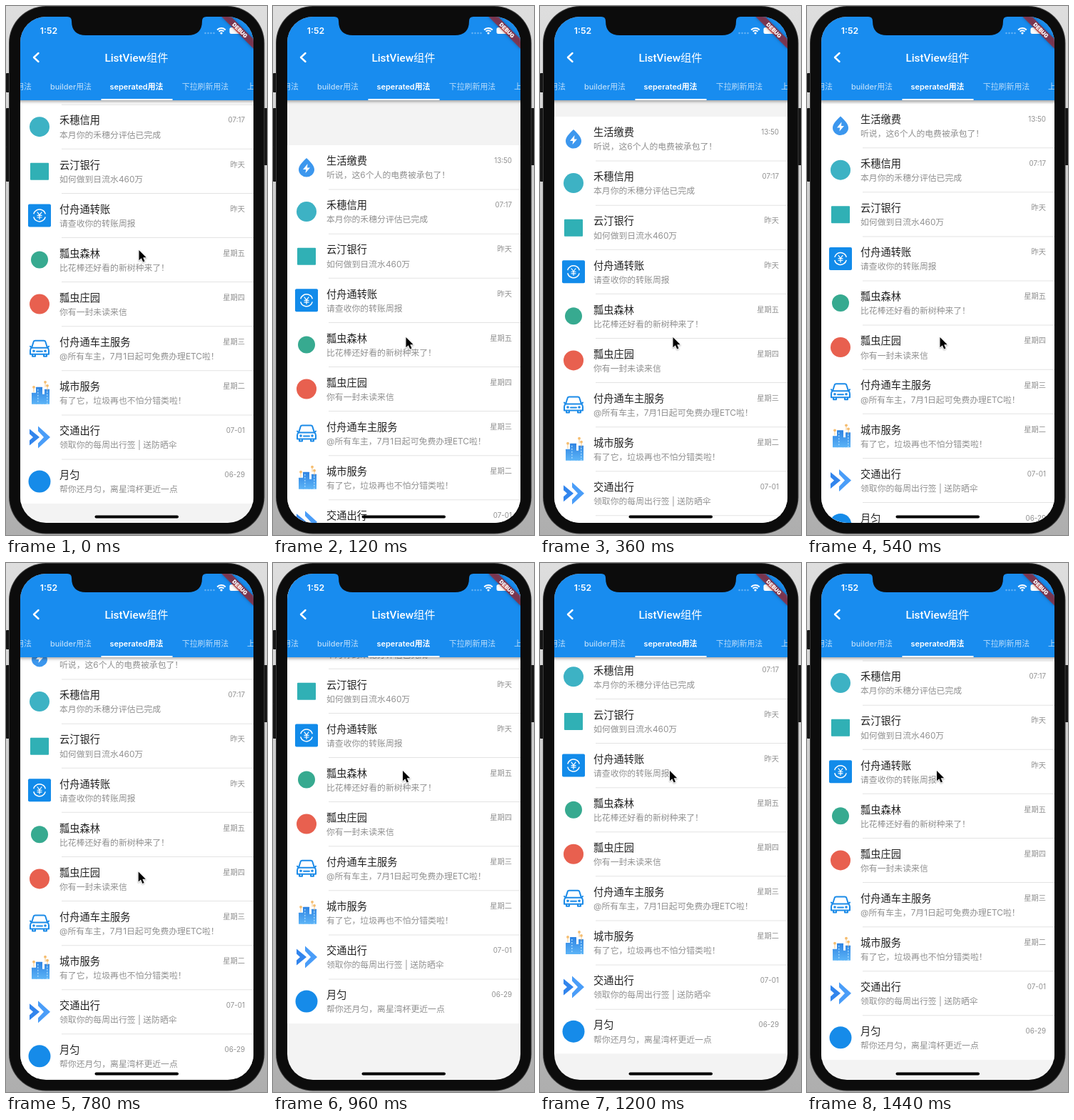
An HTML page with a canvas for the animation above (1500 ms loop, 366 px wide and 741 px high).

```html
<!DOCTYPE html>
<html lang="zh-CN">
<head>
<meta charset="utf-8">
<style>
html, body { margin: 0; width: 100%; height: 100%; overflow: hidden; }
canvas { display: block; width: 366px; height: 741px; }
</style>
</head>
<body>
<canvas id="stage"></canvas>
<script>
const W = 366, H = 741, LOOP = 1500, STEP = 60;
const SCREEN = { x: 20, y: 15, w: 327, h: 709 };
const ROW = 62.1, TOP_REST = 132, END_REST = 76.1;
const BLUE = '#188cef', BODY = '#0c0c0c';
const FAMILY = 'Inter, "Noto Sans CJK SC", "Noto Sans CJK", sans-serif';

const canvas = document.getElementById('stage');
const dpr = window.devicePixelRatio || 1;
canvas.width = W * dpr;
canvas.height = H * dpr;
const c = canvas.getContext('2d');

const rows = [
  ['生活缴费', '听说，这6个人的电费被承包了！', '13:50', drop],
  ['禾穗信用', '本月你的禾穗分评估已完成', '07:17', () => disc('#3db2c4', 14)],
  ['云汀银行', '如何做到日流水460万', '昨天', () => box(-13, -11.5, 26, 24, 1, '#30b0b5')],
  ['付舟通转账', '请查收你的转账周报', '昨天', transfer],
  ['瓢虫森林', '比花棒还好看的新树种来了！', '星期五', () => disc('#37aa90', 12)],
  ['瓢虫庄园', '你有一封未读来信', '星期四', () => disc('#e8604f', 14)],
  ['付舟通车主服务', '@所有车主，7月1日起可免费办理ETC啦！', '星期三', car],
  ['城市服务', '有了它，垃圾再也不怕分错类啦！', '星期二', city],
  ['交通出行', '领取你的每周出行签 | 送防晒伞', '07-01', chevrons],
  ['月匀', '帮你还月匀，离星湾杯更近一点', '06-29', () => disc('#168be9', 15.5)]
];

function box(x, y, w, h, r, fill) {
  c.beginPath();
  c.roundRect(x, y, w, h, r);
  c.fillStyle = fill;
  c.fill();
}

function disc(fill, r, x = 0, y = 0) {
  c.beginPath();
  c.arc(x, y, r, 0, Math.PI * 2);
  c.fillStyle = fill;
  c.fill();
}

function poly(points, fill) {
  c.beginPath();
  points.forEach(([x, y]) => c.lineTo(x, y));
  c.closePath();
  c.fillStyle = fill;
  c.fill();
}

function stroke(path, color, width) {
  c.strokeStyle = color;
  c.lineWidth = width;
  c.lineCap = c.lineJoin = 'round';
  c.stroke(new Path2D(path));
}

function text(str, x, y, size, color, align = 'left', weight = 400, family = FAMILY) {
  c.font = `${weight} ${size}px ${family}`;
  c.textAlign = align;
  c.textBaseline = 'alphabetic';
  c.fillStyle = color;
  c.fillText(str, x, y + size * 0.37);
}

// Row icons, each drawn around its own centre.
function drop() {
  c.fillStyle = '#3c97ee';
  c.fill(new Path2D('M0-13C4-9 11-3 11 3A11 10.5 0 0 1-11 3C-11-3-4-9 0-13Z'));
  poly([[1.5, -5], [-5, 3], [-0.8, 3], [-1.5, 8], [5, 0.5], [1, 0.5]], '#fff');
}

function transfer() {
  box(-16, -16, 32, 32, 2, '#128bea');
  c.strokeStyle = '#fff';
  c.lineWidth = 1.5;
  for (const start of [0.25, Math.PI + 0.25]) {
    c.beginPath();
    c.arc(0, 0, 8.5, start, start + 2.65);
    c.stroke();
  }
  stroke('M-3-4.5L0-.5L3-4.5M0-.5V5M-3 0H3M-3 2.6H3', '#fff', 1.2);
}

function car() {
  stroke('M-11-1L-8.5-9Q-8-11-6-11H6Q8-11 8.5-9L11-1M-11-1Q-13 0-13 3V8H13V3Q13 0 11-1ZM-13-3L-11-1M13-3L11-1', '#1c8be8', 2);
  stroke('M-10 9V11H-6V9M10 9V11H6V9M-4 4H4', '#1c8be8', 2);
  disc('#1c8be8', 1.8, -8, 3.5);
  disc('#1c8be8', 1.8, 8, 3.5);
}

function city() {
  const shade = c.createLinearGradient(0, -10, 0, 16);
  shade.addColorStop(0, '#2b7fe0');
  shade.addColorStop(1, '#5cb4f7');
  [[-11, 0, 7, 16], [-5, -8, 9, 24], [3, 2, 5, 14], [7, -5, 7, 21]]
    .forEach(([x, y, w, h]) => box(x, y, w, h, 0.5, shade));
  for (let i = 0; i < 5; i++) {
    box(-3, -5 + i * 4, 1.5, 2, 0, '#9fd5fc');
    box(10, -2 + i * 4, 1.5, 2, 0, '#9fd5fc');
  }
  [[-8, -8], [8, -15], [11, -10]].forEach(([x, y]) => {
    disc('#f5bd70', 1.9, x, y);
    box(x - 0.4, y, 0.8, 7, 0, '#f5bd70');
  });
}

function chevrons() {
  const arrow = (x, w, h, fill) =>
    poly([[x, -h], [x + w, 0], [x, h], [x, h - 7], [x + w - 9, 0], [x, 7 - h]], fill);
  arrow(-14, 14, 11.5, '#3285ed');
  arrow(-2, 17, 15.5, '#4a9df8');
}

// Overdamped spring: distance left after s seconds.
const spring = (slow, fast, s) => slow * Math.exp(-9.07 * s) + fast * Math.exp(-22.02 * s);

const smooth = p => {
  p = Math.min(1, Math.max(0, p));
  return p * p * (3 - 2 * p);
};

function pose(t) {
  if (t < 120) {
    const p = (t / 120) ** 1.5;
    return { top: END_REST + 119 * p, x: 186.5, y: 342 + 122 * p };
  }
  const p = smooth((t - 720) / 220);
  const cursor = { x: 186.5 - 4.5 * p, y: 464 - 173 * p };
  if (t >= 960) {
    return { top: END_REST - spring(88.4, -36.4, (t - 960) / 1000), ...cursor };
  }
  let top = TOP_REST + spring(209, -146, (t - 120) / 1000) - 173 * p;
  if (top < END_REST) top = END_REST + (top - END_REST) * 0.444;
  return { top, ...cursor };
}

function drawList(top) {
  box(20, top, 327, ROW * rows.length, 0, '#fff');
  rows.forEach(([title, note, time, icon], i) => {
    const y = top + i * ROW;
    if (y > H || y + ROW < 100) return;
    c.save();
    c.translate(47, y + 31);
    icon();
    c.restore();
    text(title, 75, y + 22, 14.22, '#202020', 'left', 500);
    text(note, 75, y + 42, 11.85, '#909090');
    text(time, 335, y + 21.5, /\d/.test(time) ? 9.8 : 10.27, '#909090', 'right');
    if (i < rows.length - 1) box(78, y + ROW - 0.5, 269, 1, 0, '#e3e3e3');
  });
}

function drawHeader() {
  c.save();
  c.shadowColor = 'rgba(0,0,0,.35)';
  c.shadowBlur = 4 * dpr;
  c.shadowOffsetY = 1.5 * dpr;
  box(10, 5, 347, 127, 0, BLUE);
  c.restore();
  stroke('M45.5 66L39 72L45.5 78', '#fff', 2.4);
  text('ListView组件', 183, 72, 15.3, '#fff', 'center', 500,
    'Roboto, "Noto Sans CJK SC", "Noto Sans CJK", sans-serif');
  const dim = 'rgba(255,255,255,.7)';
  text('用法', 36, 112.5, 10.9, dim, 'right', 500);
  text('builder用法', 91, 112.5, 10.9, dim, 'center', 500);
  text('seperated用法', 183, 112.5, 10.9, '#fff', 'center', 600);
  text('下拉刷新用法', 279.5, 112.5, 10.9, dim, 'center', 500);
  text('上拉', 338, 112.5, 10.9, dim, 'left', 500);
  box(133.5, 130, 100, 2, 0, '#fff');
}

function drawStatus() {
  text('1:52', 60, 34.5, 12.3, '#fff', 'center', 600);
  for (let i = 0; i < 4; i++) disc('rgba(255,255,255,.35)', 1.2, 279.5 + i * 4, 38);
  c.strokeStyle = '#fff';
  c.lineWidth = 2;
  c.lineCap = 'butt';
  for (const r of [4.7, 8]) {
    c.beginPath();
    c.arc(302, 39, r, -Math.PI * 0.76, -Math.PI * 0.24);
    c.stroke();
  }
  disc('#fff', 1.6, 302, 38);
  box(313.5, 30, 17, 9, 2.5, '#fff');
  c.fillStyle = BODY;
  c.fill(new Path2D('M86 10V15Q92 15 92 21Q92 41 112 41H255Q275 41 275 21Q275 15 281 15V10Z'));
}

function drawBanner() {
  c.save();
  c.translate(347, 15);
  c.rotate(Math.PI / 4);
  c.shadowColor = 'rgba(0,0,0,.5)';
  c.shadowBlur = 4 * dpr;
  box(-31.6, 22.1, 63.2, 9.5, 0, 'rgba(183,28,28,.63)');
  c.shadowColor = 'transparent';
  text('DEBUG', 0, 26.8, 7.6, '#fff', 'center', 900);
  c.restore();
}

function drawPhone() {
  const wall = c.createLinearGradient(0, 0, 0, H);
  wall.addColorStop(0, '#dedede');
  wall.addColorStop(0.5, '#c8c8c8');
  wall.addColorStop(1, '#aeaeae');
  box(0, 0, W, H, 0, wall);
  [[0, 94, 27], [0, 143, 55], [0, 197, 49], [361, 143, 80]]
    .forEach(([x, y, h]) => box(x, y, 6, h, 1, '#161616'));
  box(4, 0, 358.5, 739.5, 52, '#3a3a3a');
  box(5, 1, 356.5, 737.5, 51, BODY);
}

function drawCursor(x, y) {
  c.save();
  c.translate(x, y);
  const arrow = new Path2D('M0 0V14.2L3.3 11.2L5.7 16.5L8 15.5L5.7 10.3H10.2Z');
  c.shadowColor = 'rgba(0,0,0,.3)';
  c.shadowBlur = 2 * dpr;
  c.shadowOffsetY = dpr;
  c.strokeStyle = '#fff';
  c.lineWidth = 1.8;
  c.lineJoin = 'round';
  c.stroke(arrow);
  c.shadowColor = 'transparent';
  c.fillStyle = '#000';
  c.fill(arrow);
  c.restore();
}

function draw(now) {
  const t = Math.floor((now % LOOP) / STEP) * STEP;
  const { top, x, y } = pose(t);
  c.setTransform(dpr, 0, 0, dpr, 0, 0);
  drawPhone();
  c.save();
  c.beginPath();
  c.roundRect(SCREEN.x, SCREEN.y, SCREEN.w, SCREEN.h, 36);
  c.clip();
  box(20, 15, 327, 709, 0, '#f3f3f3');
  drawList(top);
  drawHeader();
  drawStatus();
  drawBanner();
  box(124.5, 713.5, 117.5, 4, 2, '#000');
  c.restore();
  drawCursor(x, y);
}

let start;
function tick(now) {
  start ??= now;
  draw(now - start);
  requestAnimationFrame(tick);
}
draw(0);
requestAnimationFrame(tick);
</script>
</body>
</html>
```
